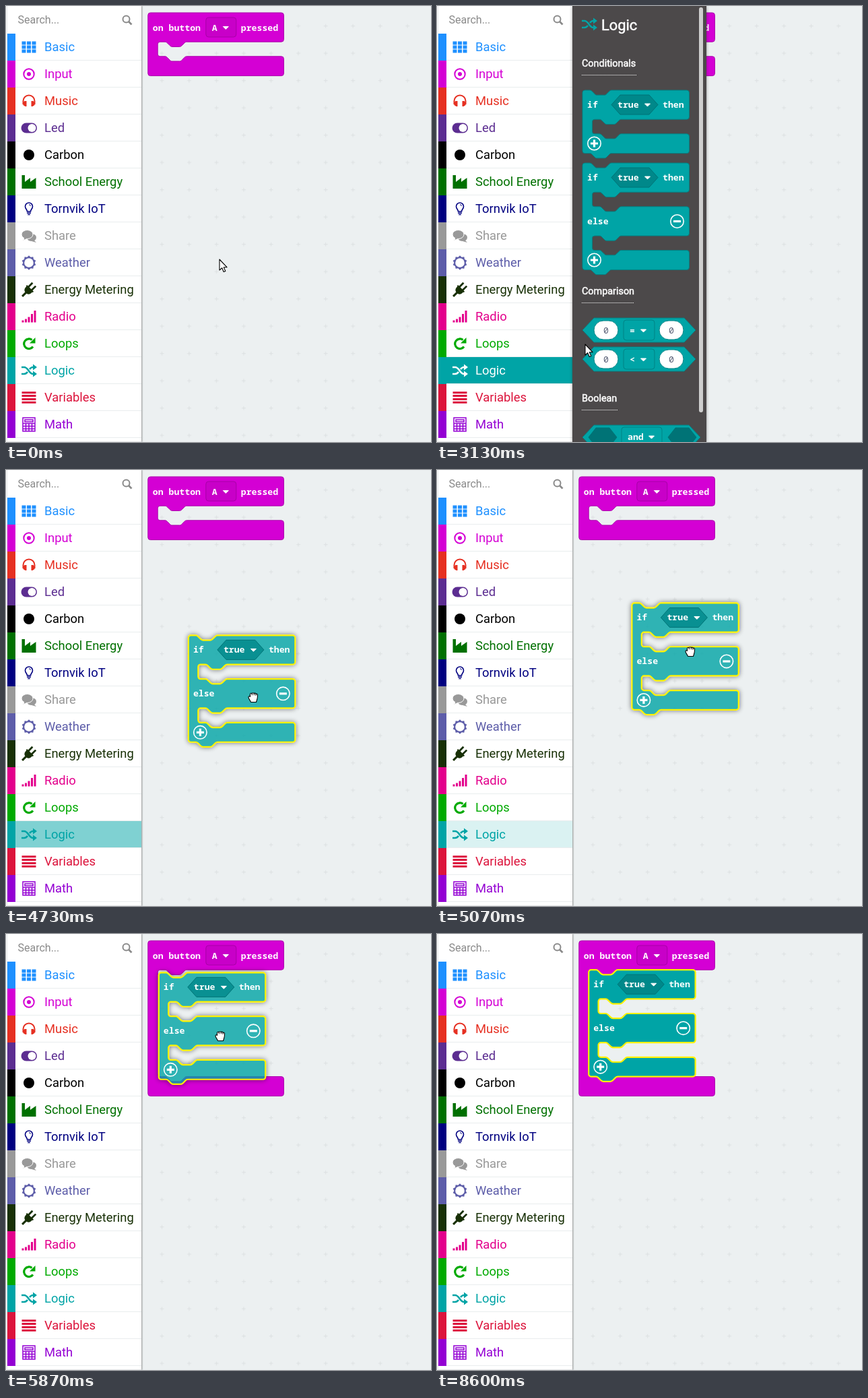
An HTML page that plays this animation: 631x647 px, repeating every 9.74 s.

```html
<!DOCTYPE html>
<html lang="en">
<head>
<meta charset="utf-8">
<title>Block editor</title>
<style>
html, body { margin: 0; width: 100%; height: 100%; overflow: hidden; background: #ecf0f1; }
svg { display: block; font: 18.4px Roboto, sans-serif; }
.row, .icon { fill: currentColor; }
.s { fill: none; stroke: currentColor; stroke-width: 2; }
.code { font: bold 13.2px "Noto Sans Mono", "DejaVu Sans Mono", monospace; fill: #fff; white-space: pre; }
.num { font-weight: 400; fill: #575e75; text-anchor: middle; }
.head { fill: #fff; stroke: #fff; stroke-width: .5; font-size: 14.4px; }
.teal { fill: #00a4a6; stroke: #008385; }
.dark { fill: #00888a; stroke: #007376; }
.shape { transform: scale(.9); vector-effect: non-scaling-stroke; }
.on > .teal { stroke: #fff200; stroke-width: 2.2; }
.ghost > .teal { fill-opacity: .8; filter: url(#lift); }
.ghost > .dark { fill-opacity: .8; }
.cursor { fill: #fff; stroke: #000; stroke-width: 1.1; stroke-linejoin: round; }
</style>
</head>
<body>
<svg id="stage" width="631" height="647" viewBox="0 0 631 647"></svg>
<script>
const TEAL = '#00a4a6', LOGIC = 12;
const stroke = (d, w = 2, more = '') => `<path class="s" d="${d}" style="stroke-width:${w}" ${more}/>`;
const fill = d => `<path d="${d}"/>`;
const code = (x, y, s) => `<text class="code" x="${x}" y="${y}">${s}</text>`;
const caret = (x, y) => `<path fill="#fff" stroke="#fff" stroke-linejoin="round" d="M${x} ${y}h8l-4 4z"/>`;
const at = (x, y, s, attrs = '') => `<g transform="translate(${x} ${y})" ${attrs}>${s}</g>`;

const sun = Array.from({length: 20}, (_, i) => {
  const a = i * Math.PI / 10, r = i % 2 ? 8.6 : 10.8;
  return (r * Math.sin(a)).toFixed(1) + ' ' + (-r * Math.cos(a)).toFixed(1);
}).join('L');
const shuffle = stroke('M-11-5h4c6 0 7 10 13 10h2M-11 5h4c2 0 3.500-1 5-3M1-2c1.500-2 3-3 5-3h2', 2.6) +
  fill('M6-9.500 12-5 6-.5zM6 .5 12 5 6 9.500z');

const rows = [
  ['Basic', '#1e90ff', stroke('M-10.500-6H11M-10.500 0H11M-10.500 6H11', 5, 'stroke-dasharray="6 1.500"')],
  ['Input', '#d400d4', '<circle class="s" r="7.700"/><circle r="3"/>'],
  ['Music', '#e63022', stroke('M-8.500 5V0a8.500 8.500 0 0 1 17 0v5') + fill('M-6.500 0h3v8h-2l-3-2V2zM6.500 0h-3v8h2l3-2V2z')],
  ['Led', '#5c2d91', '<rect x="-11.500" y="-7.500" width="23.500" height="15" rx="7.500"/><circle cx="4.500" r="6" fill="#fff"/>'],
  ['Carbon', '#000', '<circle r="8"/>'],
  ['School Energy', '#007000', fill('M-10.500 10V-10h4.500V0L2-6V0l8.500-6V10z')],
  ['Tornvik IoT', '#000080', stroke('M-2.500 4C-2.500 1-5.500 0-5.500-3.500a5.500 5.500 0 0 1 11 0C5.500 0 2.500 1 2.500 4zM-3 6.200h6M-1.800 8.500h3.600', 1.6) + stroke('M0-6.200q2.500 0 2.500 2', 1)],
  ['Share', '#999', '<ellipse cx="4" cy="2.500" rx="7" ry="5.500"/>' + fill('M7 6l4 4-7-2z') +
    '<ellipse cx="-2.500" cy="-2" rx="8.500" ry="6.500" stroke="#fff"/>' + fill('M-7 2v4l-3 1 7-3z')],
  ['Weather', '#5d5da9', fill(`M${sun}Z`) + '<circle r="6.800" fill="#fff"/>'],
  ['Energy Metering', '#183006', `<g transform="rotate(45)">${fill('M-7-3H7V-1H6V1A6 6 0 0 1 1.500 6.500V14h-3V6.500A6 6 0 0 1-6 1V-1H-7zM-4.800-11h2.800v8h-2.800zM2-11h2.800v8H2z')}</g>`],
  ['Radio', '#e3008c', stroke('M-9 8.500v-3M-4.500 8.500v-5M0 8.500v-8M4.500 8.500V-4M9 8.500V-9', 3)],
  ['Loops', '#00aa00', stroke('M6 4.500A7.300 7.300 0 1 1 4.500-5.500', 3.2) + fill('M9.500-9v8.500H1z')],
  ['Logic', TEAL, shuffle],
  ['Variables', '#dc143c', stroke('M-10.500-7.200h21M-10.500-2.400h21M-10.500 2.400h21M-10.500 7.200h21', 3)],
  ['Math', '#9400d3', stroke('M-9-10H9V10H-9zM-6-7H6v3H-6zM-9-1.500H9M-9 2.500H9M-9 6.500H9M-4.500-1.500V10M0-1.500V10M4.500-1.500V10', 1.5)]
];

// Connector notch, drawn rightwards and leftwards.
const notch = 'c2 0 3 1 4 2l4 4c1 1 2 2 4 2h12c2 0 3-1 4-2l4-4c1-1 2-2 4-2';
const back = 'c-2 0-3 1-4 2l-4 4c-1 1-2 2-4 2h-12c-2 0-3-1-4-2l-4-4c-1-1-2-2-4-2';

// Edges alternate: bottom of a body row, bottom of a slot, and so on.
function outline(w, edges, chained) {
  let d = `M0 4a4 4 0 0 1 4-4${chained ? 'H12' + notch : ''}H${w - 4}a4 4 0 0 1 4 4`;
  edges.forEach((y, i) => {
    d += `V${y - 4}`;
    if (i % 2) d += `a4 4 0 0 0 4 4H28${notch}H${w - 4}a4 4 0 0 1 4 4`;
    else if (i < edges.length - 1) d += `a4 4 0 0 1-4 4H64${back}H20a4 4 0 0 0-4 4`;
    else d += `a4 4 0 0 1-4 4${chained ? 'H48' + back : ''}H4a4 4 0 0 1-4-4z`;
  });
  return d;
}

const button = (x, y, sign) => at(x, y, `<circle r="9.700" fill="none" stroke="#fff" stroke-width="1.600"/>
  <path d="${sign}" stroke="#fff" stroke-width="3.200"/>`);
const plus = 'M-5.500 0h11M0-5.500v11', minus = 'M-5.500 0h11';
const body = edges => `<path class="teal shape" d="${outline(176, edges, true)}"/>` + code(7, 26, 'if') +
  '<path class="dark" d="M43 21.500 56 7H99l13 14.500L99 36H56z"/>' +
  code(52, 26, 'true') + caret(92.5, 20) + code(119, 26, 'then');
const ifBlock = body([48, 72, 104]) + button(17.5, 79, plus);
const ifElse = body([48, 72, 120, 144, 176]) + code(7, 91, 'else') +
  button(140.5, 86.5, minus) + button(17.5, 144, plus);

const pill = x => `<rect x="${x}" y="4" width="36" height="28" rx="14" fill="#fff" stroke="#008385"/>
  <text class="code num" x="${x + 18}" y="23">0</text>`;
const compare = op => '<path class="teal" d="M0 18 17 0H151l17 18-17 18H17z"/>' + pill(17) + pill(114) +
  '<rect x="61" y="3" width="46" height="30" rx="4" fill="none" stroke="#008385"/>' + code(70, 23, op) + caret(86.5, 17);
const heading = (y, w, s) => `<text class="head" x="215" y="${y}">${s}</text>
  <path d="M215 ${y + 12.5}h${w}" stroke="#fff" stroke-dasharray="1 1"/>`;
const flyout = `<rect x="201" width="199" height="647" fill="#4c494a" style="filter:drop-shadow(0 0 2px rgba(0,0,0,.4))"/>` +
  at(226, 27, shuffle, `class="icon" color="${TEAL}"`) +
  '<text class="head" x="244" y="35.500" style="font-size:21.800px">Logic</text>' +
  heading(90, 81, 'Conditionals') + heading(428, 78, 'Comparison') + heading(587, 53, 'Boolean') +
  at(216, 125, ifBlock) + at(216, 233, ifElse, 'id="source"') +
  at(216, 463, compare('='), 'id="equal"') + at(216, 506, compare('&lt;'), 'id="less"') +
  at(216, 622, `<path class="teal" d="M0 18 17 0H158l17 18-17 18H17z"/>
    <path class="dark" d="M9 18 20 4H40L51 18 40 32H20zM127 18l11-14h20l11 14-11 14h-20z" style="fill:#007376"/>
    <rect class="teal" x="58" y="3" width="60" height="30" rx="4"/>` + code(67, 22, 'and') + caret(98.5, 16)) +
  '<rect x="389" y="2" width="6" height="601" rx="3" fill="#cecece"/>';

const cursors = {
  arrow: '<path d="M0 0V16L3.700 12.700 6.200 18.500 8.800 17.400 6.300 11.700H11z"/>',
  point: '<path d="M-1.700 1.200c0-2.600 3.300-2.600 3.300 0V8c.5-1.400 2.900-1.200 3 .5.5-1.100 2.700-.8 2.900.8.5-1 2.700-.6 2.700 1.200v5c0 3-1.700 4-1.700 7H.5c-.5-3-5-6.500-6-9-.6-1.800 1.500-2.700 3-.7l.8 1z"/><path d="M1.600 8v4M4.600 9v3M7.500 10v2" fill="none"/>',
  open: '<path d="M-3 9C-4 6-7.500 3-8 1c-.3-1.700 2-2 3-.5l1 1-2-6.500c-.4-2 2-2.500 2.600-.6l1 2.600-.4-4.300c0-2 2.500-2 2.700 0l.4 4 .9-3.500c.5-1.800 2.700-1.200 2.500.6l-.3 4 1.500-2c1-1.500 2.700-.4 2.300 1.200C6 1 6.500 6 4.500 9z"/><path d="M-2.400-3l.9 4M.3-3v4M3-2L2.600 1.500" fill="none"/>',
  closed: '<path d="M-3.500 7.500C-4 5-7 3-7 0c0-1.500 2-1.500 2.500-.5V-4c0-2 2.200-2.300 2.800-.8.2-2 2.500-2 3 0 .5-1.700 2.500-1.300 2.700.5.8-1.200 2.500-.7 2.500 1.200C6.800 2 5.500 4 4.500 7.500z"/><path d="M-1.700-4.800v2M1.300-4.800v2M4-4.300v2" fill="none"/>'
};

const stage = document.getElementById('stage');
stage.innerHTML = `
  <filter id="lift" x="-20%" y="-20%" width="140%" height="140%" color-interpolation-filters="sRGB">
    <feComponentTransfer in="SourceAlpha" result="solid"><feFuncA type="linear" slope="1.25"/></feComponentTransfer>
    <feGaussianBlur stdDeviation="4"/>
    <feComponentTransfer><feFuncA type="linear" slope=".5"/></feComponentTransfer>
    <feComposite operator="out" in2="solid" result="shadow"/>
    <feMerge><feMergeNode in="shadow"/><feMergeNode in="SourceGraphic"/></feMerge>
  </filter>
  <pattern id="grid" x="211" y="9.200" width="40.520" height="40.500" patternUnits="userSpaceOnUse">
    <path d="M17.500 20.500h6M20.500 17.500v6" stroke="#dce0e1"/></pattern>
  <rect width="631" height="647" fill="#ecf0f1"/><rect x="203" width="428" height="647" fill="url(#grid)"/>
  ${at(210.8, 10, `<path id="event" class="shape" fill="#d400d4" stroke="#aa00aa"/>
    <rect x="86" y="7" width="45" height="29" rx="4" fill="#c800c8" stroke="#a800a8"/>` +
    code(7, 27, 'on button') + code(95, 27, 'A') + caret(111.5, 20.5) + code(138, 27, 'pressed'))}
  <rect width="201" height="647" fill="#fff" style="filter:drop-shadow(1px 0 1px rgba(0,0,0,.4))"/>
  <path d="M1.500 0V646.500H201" fill="none" stroke="#e4e6e7"/>
  <text x="17.500" y="26" fill="#8a8a8a" style="font-size:16px">Search...</text>
  <g class="icon" color="#8a8a8a"><circle class="s" cx="178.500" cy="19.500" r="5"/>${stroke('M182 23l4.500 4.500', 2.6)}</g>
  ${rows.map(([name, color, icon], i) => at(0, 41 + 40 * i, `<rect class="bg" x="14" width="187" height="39.500" fill="#fff"/>
    <path d="M14 39.500H201" stroke="#e9edee"/><rect x="2" width="12" height="40" fill="${color}"/>
    ${at(34, 20, icon)}<text x="57" y="26">${name}</text>`, `class="row" color="${color}"`)).join('')}
  <g id="flyout">${flyout}</g>
  <g id="block">${ifElse}</g>
  <g id="cursor" class="cursor">${Object.keys(cursors).map(k => `<g id="${k}">${cursors[k]}</g>`).join('')}</g>`;

const el = id => document.getElementById(id);
const show = (id, on) => el(id).setAttribute('display', on ? 'inline' : 'none');
const move = (id, [x, y]) => el(id).setAttribute('transform', `translate(${x} ${y})`);
const rowEls = [...stage.querySelectorAll('.row')], bgs = [...stage.querySelectorAll('.bg')];
const idle = outline(224, [48, 72, 104]), grown = outline(224, [48, 224, 256]);

const STEP = 200 / 3;             // the screen updates 15 times per second
const GRAB = [91, 95], SLOT = [225.2, 53.2];
const path = [[600, 317, 376], [1200, 215, 442], [1600, 145, 496], [2000, 132, 526], [2330, 131, 537],
  [2600, 140, 534], [3130, 219, 502], [3600, 359, 366], [3870, 301, 324], [4070, 307, 328], [4200, 307, 328],
  [4500, 345, 345], [4730, 367, 337], [4970, 381, 300], [5200, 360, 222], [5400, 331, 180], [5600, 319, 157],
  [6130, 317, 149], [6800, 317, 149], [6867, 318, 153], [7350, 367, 290], [7800, 320, 403], [7930, 311, 411],
  [8400, 311, 411], [8533, 135, 640], [8600, 110, 690]];

// Smooth curve through the path points that never overshoots them.
function along(t) {
  const end = path.length - 1;
  t = Math.max(path[0][0], Math.min(path[end][0], t));
  const i = Math.min(end - 1, path.findLastIndex(p => p[0] <= t));
  const h = path[i + 1][0] - path[i][0], u = (t - path[i][0]) / h;
  return [1, 2].map(c => {
    const rise = k => k < 0 || k >= end ? 0 : (path[k + 1][c] - path[k][c]) / (path[k + 1][0] - path[k][0]);
    const slope = k => {
      const a = rise(k - 1), b = rise(k);
      return a * b > 0 ? 2 * a * b / (a + b) : 0;
    };
    const p = path[i][c], q = path[i + 1][c];
    return p + (q - p) * u * u * (3 - 2 * u) + h * u * (1 - u) * (slope(i) * (1 - u) - slope(i + 1) * u);
  });
}
const clamp = v => Math.max(0, Math.min(1, v));

function draw(t) {
  const [x, y] = along(t);
  const open = t >= 2460 && t < 4260, drag = t >= 4260 && t < 6330, placed = t >= 4260;
  const inside = (top, bottom, right) => open && x > 216 && x < right && y > top && y < bottom;
  const over = {source: inside(233, 392, 375), equal: inside(463, 499, 384), less: inside(506, 542, 384)};
  const row = x < 201 && y < 641 ? Math.floor((y - 41) / 40) : -1;

  show('flyout', open);
  for (const id in over) el(id).setAttribute('class', over[id] ? 'on' : '');
  show('block', placed);
  el('block').setAttribute('class', drag ? 'on ghost' : 'on');
  // The dragged block trails the hand by one update.
  move('block', drag ? along(t - STEP).map((v, i) => v - GRAB[i]) : SLOT);
  el('event').setAttribute('d', t >= 5530 ? grown : idle);

  bgs.forEach((bg, i) => {
    bg.setAttribute('fill', i === row ? '#e9ecec' : '#fff');
    bg.setAttribute('fill-opacity', 1);
  });
  const glow = open ? clamp((t - 2400) / 500) : placed ? clamp(1 - (t - 4270) / 930) : 0;
  if (glow) {
    bgs[LOGIC].setAttribute('fill', TEAL);
    bgs[LOGIC].setAttribute('fill-opacity', glow);
  }
  rowEls[LOGIC].setAttribute('color', open && t > 2600 ? '#fff' : TEAL);

  const onBlock = Object.values(over).some(Boolean) || (t >= 6330 && y < 212);
  const kind = drag || (t >= 4190 && open) ? 'closed' : onBlock ? 'open' : x < 201 ? 'point' : 'arrow';
  for (const k in cursors) show(k, k === kind);
  move('cursor', [Math.round(x), Math.round(y)]);
}

function tick() {
  const t = performance.now() % 9740;
  draw(Math.floor((t + 4) / STEP) * STEP);
  requestAnimationFrame(tick);
}
tick();
</script>
</body>
</html>
```
